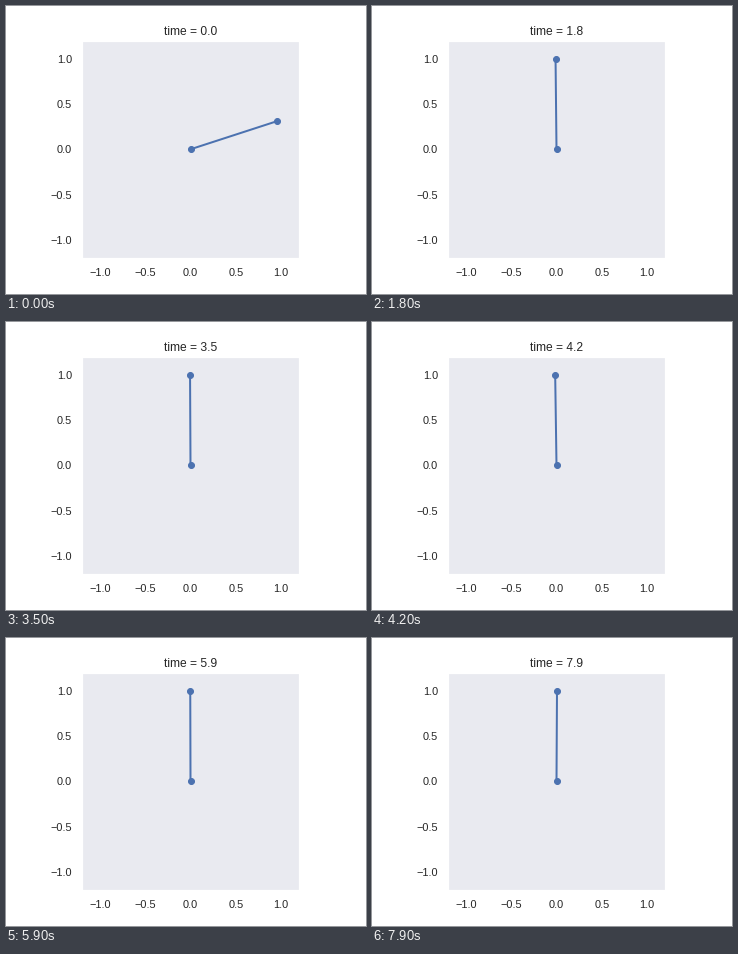
A matplotlib script that plays this animation: 360x288 px, repeating every 8 s.

```python
import numpy as np
import matplotlib.pyplot as plt
from matplotlib.animation import FuncAnimation

FRAMES, STEP_MS = 80, 100
BLUE, INK = "#4C72B0", "#262626"

plt.rcParams.update({
    "font.family": "Liberation Sans",
    "text.color": INK,
    "xtick.color": INK,
    "ytick.color": INK,
    "figure.subplot.bottom": 0.125,
})

# Clockwise degrees turned per step during the swing-up, starting 72 degrees off upright
SWING = [1.8, 5.1, 8.1, 14, 18.5, 23.5, 27, 28, 27,
         30, 28.5, 24, 19, 14, 9.5, 5.5, 3, 0.9]
swing_angles = 72 + np.concatenate([[0], np.cumsum(SWING)])


def balance(t):
    """Small wobble around upright, in degrees."""
    size = 1.6 + 1.4 * np.cos(2 * np.pi * (t - 2.3) / 7.2)
    return 0.632 * (size * np.sin(2 * np.pi * 11 / 7 * t) - 0.45)


def angle(i):
    deg = swing_angles[i] if i < len(swing_angles) else balance(i / 10)
    return np.radians(deg)


fig, ax = plt.subplots(figsize=(5, 4), dpi=72, facecolor="white")
ax.set(xlim=(-1.2, 1.2), ylim=(-1.2, 1.2), aspect="equal", facecolor="#E9EAF0")
ticks = np.arange(-1, 1.1, 0.5)
ax.set_xticks(ticks)
ax.set_yticks(ticks)
ax.tick_params(length=6, pad=3.5, labelsize=11, bottom=False, left=False)
for spine in ax.spines.values():
    spine.set(color="white", linewidth=1.25)

rod, = ax.plot([], [], "o-", color=BLUE, lw=2, ms=6, solid_capstyle="round")
title = ax.set_title("", fontsize=12, pad=6)


def draw(i):
    a = angle(i)
    rod.set_data([0, np.sin(a)], [0, np.cos(a)])
    title.set_text(f"time = {i / 10:.1f}")
    return rod, title


anim = FuncAnimation(fig, draw, frames=FRAMES, interval=STEP_MS,
                     repeat=True, repeat_delay=0, blit=False)
plt.show()
```
